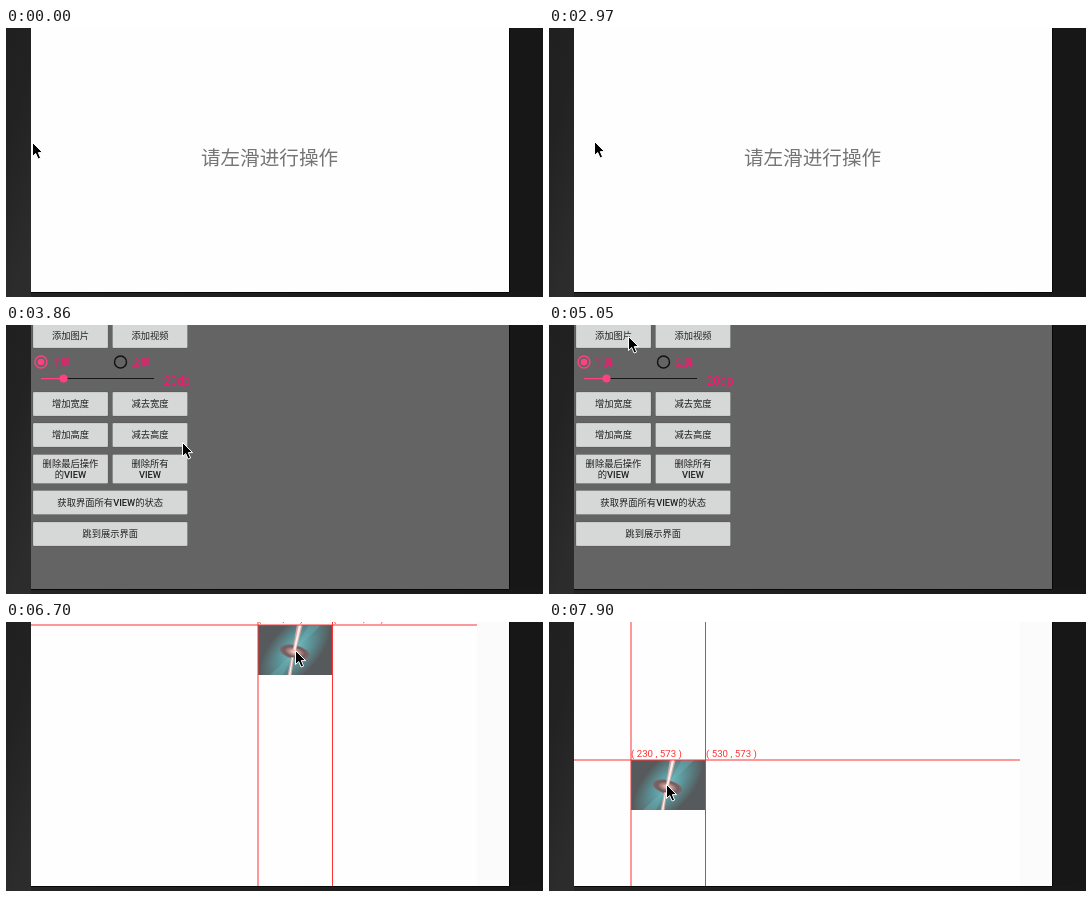
Animation, 537 px wide and 269 px high, one loop 8000 ms. Source, as an HTML page:

```html
<!DOCTYPE html>
<html lang="zh-CN">
<head>
<meta charset="utf-8">
<style>
  html, body { margin: 0; width: 100%; height: 100%; overflow: hidden; background: #181818; }
  svg { display: block; font-family: Roboto, "Noto Sans CJK SC", sans-serif; }
  #drawer { font-size: 9.3px; fill: #f5186f; }
  #buttons { text-anchor: middle; font-weight: 500; fill: #202020; }
  #buttons rect { fill: #d6d7d7; stroke: #0003; stroke-width: .6; }
  #guides { fill: #f33; font-size: 9.7px; }
</style>
</head>
<body>
<svg width="537" height="269" viewBox="0 0 537 269">
  <defs>
    <linearGradient id="left" x2=".3" y2="1">
      <stop stop-color="#202020"/><stop offset=".4" stop-color="#222"/><stop offset="1" stop-color="#2c2c2c"/>
    </linearGradient>
    <linearGradient id="bottom"><stop stop-color="#242424"/><stop offset="1" stop-color="#181818"/></linearGradient>
    <radialGradient id="glow">
      <stop stop-color="#2ba0a8"/><stop offset=".5" stop-color="#0b5960"/><stop offset="1" stop-color="#050b0d"/>
    </radialGradient>
    <radialGradient id="disc">
      <stop stop-color="#ffd0c4"/><stop offset=".35" stop-color="#a05a54"/><stop offset=".7" stop-color="#2a1113"/><stop offset="1" stop-color="#4a2023"/>
    </radialGradient>
    <clipPath id="screen"><path d="M25 0H503V264H25z"/></clipPath>
    <clipPath id="frame"><path d="M0 0H74.5V50H0z"/></clipPath>
  </defs>

  <path fill="url(#left)" d="M0 0H25V269H0z"/>
  <path fill="#171717" d="M503 0H537V269H503z"/>
  <path fill="url(#bottom)" d="M25 264H537V269H25z"/>
  <path fill="#080808" d="M25 264H504V0H503V265H25z"/>

  <g clip-path="url(#screen)">
    <path fill="#fbfbfb" d="M25 0H503V264H25z"/>
    <path id="canvas" fill="#fefefe" d="M25 0H471V264H25z"/>
    <g id="hint">
      <path fill="#fefefe" d="M25 0H503V264H25z"/>
      <text x="263.5" y="137" font-size="19.6" text-anchor="middle" fill="#757575">请左滑进行操作</text>
    </g>
    <g id="picture"><g clip-path="url(#frame)">
      <path fill="#050b0d" d="M0 0H75V50H0z"/>
      <ellipse cx="37" cy="25" rx="46" ry="24" fill="url(#glow)" transform="rotate(-48 37 25)"/>
      <path fill="#2a98a0" opacity=".35" d="M37 26L52-3 66-3zM37 26L10 52 24 52z"/>
      <ellipse cx="36.5" cy="27" rx="15" ry="7" fill="url(#disc)" transform="rotate(14 36.5 27)"/>
      <path fill="#e08a80" opacity=".8" d="M39-1H45L38 26H34.5zM33 32H36L33.5 51H29.5z"/>
      <path fill="#ffe6df" d="M41-1H43.5L37.5 25H35.5zM34 33H35L32.3 51H30.7z"/>
    </g></g>
    <g id="guides">
      <rect id="top" x="25" width="446" height="1"/>
      <rect id="start" width="1" height="264"/>
      <rect id="end" width="1" height="264"/>
      <text id="startLabel"/>
      <text id="endLabel"/>
    </g>
    <path id="scrim" d="M25 0H503V264H25z"/>
    <g id="drawer">
      <g id="buttons"></g>
      <circle cx="35" cy="37" r="6" fill="none" stroke="#ff4081" stroke-width="1.4"/>
      <circle cx="35" cy="37" r="3.3" fill="#ff4081"/>
      <circle cx="114.5" cy="37" r="6" fill="none" stroke="#101010" stroke-width="1.4"/>
      <text x="45.5" y="40.5" font-weight="500">半屏</text>
      <text x="125.5" y="40.5" font-weight="500">全屏</text>
      <path fill="#161616" d="M57 53H148V54H57z"/>
      <path fill="#ff4081" d="M35 53H57V54.2H35z"/>
      <circle cx="57.5" cy="53.6" r="4" fill="#ff4081"/>
      <text x="157.5" y="60" font-size="12">20dp</text>
    </g>
  </g>
  <path id="cursor" d="M.5 .5V14.5L3.7 11.5 6.1 17 8.6 16 6.3 10.6H10.6z" stroke="#fff" stroke-linejoin="round"/>
</svg>
<script>
const $ = id => document.getElementById(id);
const LOOP = 8000;

const button = (x, y, w, h, ...lines) => {
  const labels = lines.map((line, i) =>
    `<text x="${x + w / 2}" y="${y + h / 2 + 3.4 + (i - (lines.length - 1) / 2) * 10.5}">${line}</text>`);
  $('buttons').innerHTML += `<rect x="${x}" y="${y}" width="${w}" height="${h}" rx="1"/>` + labels.join('');
};
const buttonPair = (y, h, left, right) => {
  button(27, y, 75, h, ...left);
  button(106.5, y, 75, h, ...right);
};
buttonPair(-1, 24, ['添加图片'], ['添加视频']);
buttonPair(67, 24, ['增加宽度'], ['减去宽度']);
buttonPair(98, 24, ['增加高度'], ['减去高度']);
buttonPair(129.5, 29, ['删除最后操作', '的VIEW'], ['删除所有', 'VIEW']);
button(27, 165.5, 154.5, 24, '获取界面所有VIEW的状态');
button(27, 197, 154.5, 24, '跳到展示界面');

// Each move: first step time, last step time, number of steps, destination
const cursorMoves = [
  [300, 440, 2, 25, 112],
  [900, 1190, 3, 191, 115],
  [1630, 1630, 1, 165, 121],
  [2080, 2370, 3, 4, 107],
  [2520, 2670, 2, 27, 114],
  [2970, 2970, 1, 45, 113],
  [3110, 3260, 2, 209, 150],
  [3710, 4750, 8, 75, 16],
  [4900, 5050, 2, 79, 11],
  [5800, 6100, 3, 285, 20],
  [6700, 6700, 1, 289, 28],
  [6850, 7900, 8, 117, 162],
];
const pictureMoves = [[6700, 6700, 1, 252, 3], [6850, 7900, 8, 82, 138]];
const drawerMoves = [[3110, 3260, 2, 0], [5500, 5650, 2, -158], [5800, 5800, 1, -165]];

function follow(moves, start, t) {
  let pos = start;
  for (const [from, to, steps, ...target] of moves) {
    if (t < from) break;
    const step = t >= to ? steps : Math.floor((t - from) / (to - from) * (steps - 1) + .05) + 1;
    pos = pos.map((p, i) => p + (target[i] - p) * step / steps);
  }
  return pos;
}

const place = (id, x, y = 0) => $(id).setAttribute('transform', `translate(${x} ${y})`);
const show = (id, on) => $(id).style.display = on ? '' : 'none';

function label(id, x, y, value) {
  place(id, x, y - 3);
  $(id).textContent = `( ${value} , ${Math.round((y + 4) * 4.035)} )`;
}

function render(t) {
  const hinting = t < 3710, dragging = t >= 6700;
  const [x, y] = follow(pictureMoves, [248, -5], t).map(Math.round);
  const [drawer] = follow(drawerMoves, [-165], t);

  place('cursor', ...follow(cursorMoves, [26, 114], t).map(Math.round));
  place('drawer', drawer);
  $('scrim').style.opacity = Math.max(0, 1 + drawer / 158) * (hinting ? .866 : .6);
  show('hint', hinting);

  show('picture', t >= 5500);
  place('picture', x, y);
  $('picture').style.opacity = dragging ? .67 : 1;

  show('canvas', dragging);
  show('guides', dragging);
  place('top', 0, y - .5);
  place('start', x - .5);
  place('end', x + 74);
  const left = Math.round((x - 25) * 4.035);
  label('startLabel', x, y, left);
  label('endLabel', x + 75, y, left + 300);
}

function tick() {
  render(performance.now() % LOOP);
  requestAnimationFrame(tick);
}
tick();
</script>
</body>
</html>
```
